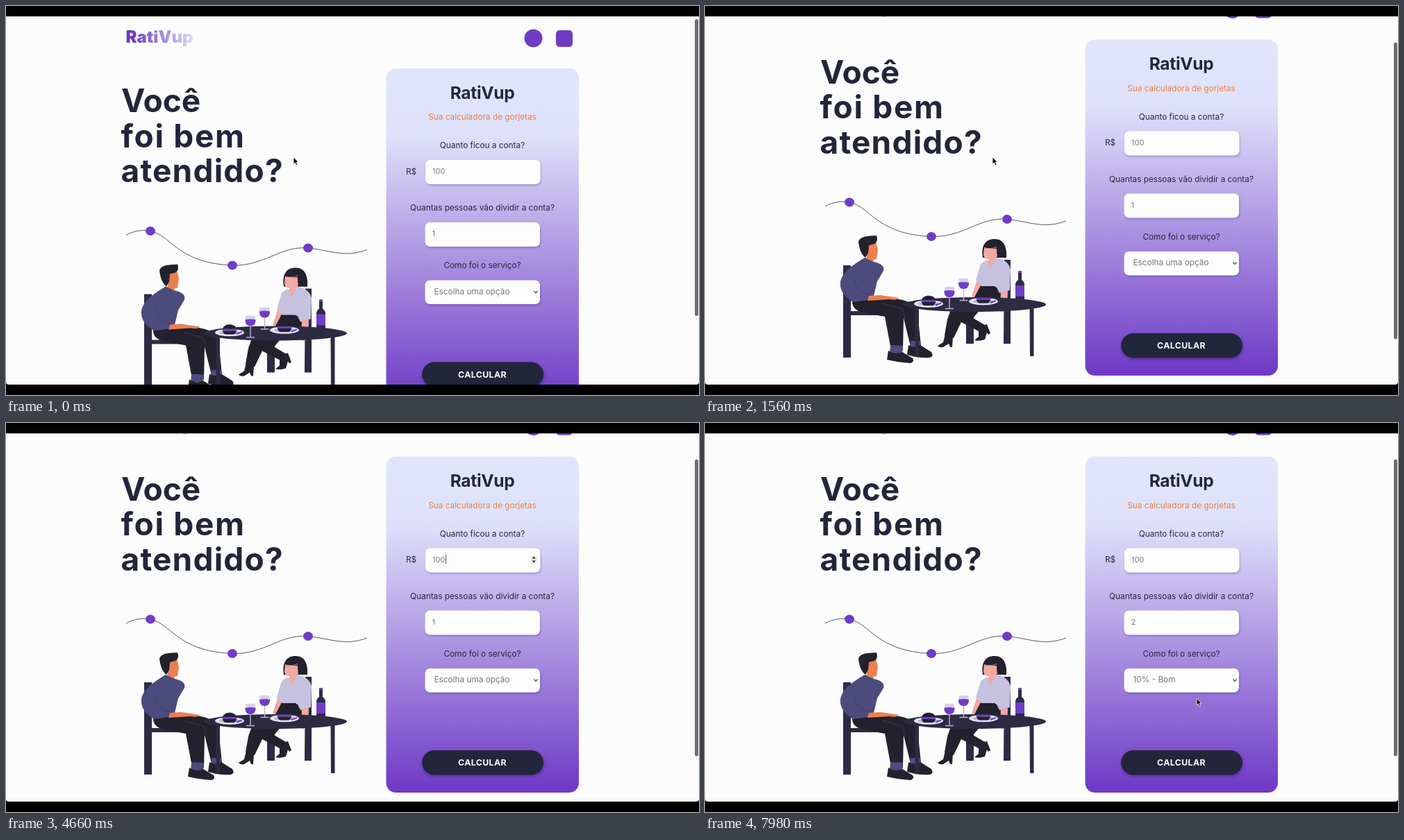
These frames come from a looping animation (998x561 px, 8 s). An HTML page:

```html
<!DOCTYPE html>
<html lang="pt-BR">
<head>
<meta charset="utf-8">
<title>Calculadora de gorjetas</title>
<style>
html, body { margin: 0; width: 100%; height: 100%; overflow: hidden; background: #000; }
svg { display: block; width: 100vw; height: 100vh; }
text { font-family: Inter, "Open Sans", sans-serif; font-size: 11.8px; fill: #25273a; }
.mid text { text-anchor: middle; }
.head text { font-size: 46px; font-weight: 700; fill: #23263a; }
.value text { fill: #777; }
.box { fill: #fdfdfd; filter: drop-shadow(1px 2px 1.5px rgba(50, 25, 110, .28)); }
.dark { fill: #22212d; }
.wood { fill: #2d2b42; }
.blue { fill: #4c4b7d; }
.skin { fill: #ec7f50; }
.pink { fill: #f2a8a4; }
.lilac { fill: #c6c1df; }
.violet { fill: #6f3cc6; }
</style>
</head>
<body>
<svg viewBox="0 0 998 561" preserveAspectRatio="none">
  <defs>
    <linearGradient id="cardFill" x1="0" y1="0" x2="0" y2="1">
      <stop offset="0" stop-color="#e0e5fc"/>
      <stop offset=".2" stop-color="#dfe1fa"/>
      <stop offset=".5" stop-color="#b5a1e6"/>
      <stop offset="1" stop-color="#6e38c5"/>
    </linearGradient>
    <linearGradient id="logoFill">
      <stop offset=".1" stop-color="#6d38c4"/>
      <stop offset="1" stop-color="#dcdcf8"/>
    </linearGradient>
    <clipPath id="view"><path d="M0 15 H998 V542 Q998 546 994 546 H4 Q0 546 0 542Z"/></clipPath>
    <g id="spinner">
      <rect x="755.5" y="232" width="9.5" height="13" rx="1.5" fill="#ececec"/>
      <path d="M757.6 237.2 L760.2 233.6 L762.8 237.2Z M757.6 239.8 L760.2 243.4 L762.8 239.8Z" fill="#444"/>
    </g>
    <g id="glass">
      <path d="M0 13 V31 M-6 31.5 H6" stroke="#b9b4d6" stroke-width="1.4" fill="none"/>
      <path d="M-6.5 0 H6.5 C9 9 6 15 0 15 S-9 9 -6.5 0Z" fill="#d4d0ea"/>
      <path d="M-7.6 6 Q0 4 7.6 6 C7.4 12 5 15 0 15 S-7.4 12 -7.6 6Z" class="violet"/>
    </g>
    <g id="meal">
      <ellipse rx="21" ry="5.2" fill="#e6e4f3"/>
      <ellipse rx="15" ry="3.2" fill="#b9b4d6"/>
      <path d="M-10 -5 C-9 -14 9 -14 10 -5Z" class="dark"/>
      <rect x="-10.5" y="-5.5" width="21" height="3" rx="1.5" class="violet"/>
      <path d="M-10 -2.5 H10 Q9 2.5 5 2.5 H-5 Q-9 2.5 -10 -2.5Z" class="dark"/>
      <path d="M10 2 L18 -1" stroke="#6f3cc6" stroke-width="2"/>
    </g>
  </defs>

  <rect width="998" height="561"/>
  <g clip-path="url(#view)">
    <rect y="15" width="998" height="531" fill="#fcfcfc"/>
    <g id="page">
      <text x="172.5" y="53" style="font-size:24px;font-weight:900;fill:url(#logoFill)">RatiVup</text>
      <circle cx="759.5" cy="46.5" r="13" class="violet"/>
      <rect x="792" y="35" width="24" height="24" rx="5" class="violet"/>

      <g class="head">
        <text x="166" y="153" letter-spacing="0">Você</text>
        <text x="165.5" y="203.5" letter-spacing="1.7">foi bem</text>
        <text x="165.5" y="254" letter-spacing="1.2">atendido?</text>
      </g>

      <g transform="translate(0 41.5)">
        <path d="M173 289 C185 282 198 281 208 283 C238 289 246 329 326 332.5 C372 334 395 304 435 307.5 C468 311 488 322 520 310" fill="none" stroke="#45445a" stroke-width=".9"/>
        <g class="violet">
          <ellipse cx="208" cy="283" rx="7" ry="6.4"/>
          <ellipse cx="326" cy="332.5" rx="7" ry="6.4"/>
          <ellipse cx="435" cy="307.5" rx="7" ry="6.4"/>
        </g>

        <!-- chairs -->
        <path class="wood" d="M199 374 H210 V440 H270 V446 H210 V507 H199Z M431 366 H440 V487 H430Z M376 436 H387 V487 H376Z"/>

        <!-- woman -->
        <path class="dark" d="M354 438 L398 436 L386 450 L403 460 L394 469 L369 456 L358 479 L345 475 L349 452Z"/>
        <path class="dark" d="M346 473 L357 477 L356 492 H353 L351 487 L343 492 Q337 493 335 490 L343 485Z"/>
        <path class="dark" d="M394 462 L406 459 L411 472 L408 474 L406 471 L403 481 Q395 484 388 482 L394 477Z"/>
        <path class="dark" d="M400 363 C397 344 405 336 417 336 C430 336 435 347 434 363 L422 363Z"/>
        <path class="pink" d="M402 348 Q411 351 420 347 L421 361 L417 366 L419 371 L411 381 L405 371 L409 365 Q402 366 401 358Z"/>
        <path class="pink" d="M391 397 L401 402 L391 421 L384 419Z"/>
        <path class="dark" d="M397 403 Q416 399 425 410 L430 433 L386 424Z"/>
        <path class="lilac" d="M406 366 L411 378 L419 363 Q437 366 440 380 L439 410 L424 414 L419 404 L398 404 L390 396 L397 372Z"/>
        <path class="pink" d="M426 412 L436 411 L435 435 Q431 444 425 440Z"/>
        <path class="dark" d="M400 349 Q418 351 425 345 L434 363 L421 363 L420 350Z"/>

        <!-- man -->
        <path class="dark" d="M212 424 L262 421 C286 422 303 428 306 441 L311 490 L296 491 L286 450 L285 497 L268 496 L259 448 L224 441 Q211 437 212 424Z"/>
        <path d="M288 449 L284 437 L255 429" stroke="#3a394b" stroke-width="1" fill="none"/>
        <path class="blue" d="M267 489 L285 490 L284 501 H266Z M296 483 L310 483 L311 493 H295Z"/>
        <path class="dark" d="M264 497 Q274 504 284 499 L299 508 Q302 513 296 515 Q278 514 262 510Z"/>
        <path class="dark" d="M293 489 Q302 494 310 489 L326 499 Q330 505 324 507 Q306 508 291 503Z"/>
        <path class="skin" d="M229 343 L246 339 L249 352 L247 365 L242 366 L244 374 L229 373 L233 361Z"/>
        <path class="dark" d="M221 340 C224 331 235 332 247 331 Q250 339 244 343 L236 345 L235 356 L231 363 C225 358 222 350 221 340Z"/>
        <path class="blue" d="M230 363 L243 369 C253 371 259 375 257 382 L248 397 L243 418 L236 424 L213 427 C199 418 194 409 195 398 C198 383 212 374 230 363Z"/>
        <path d="M216 393 Q214 410 237 417" stroke="#3f3e6b" stroke-width="1" fill="none"/>
        <path class="skin" d="M236 418 L253 417 L266 419 L279 421 Q277 425 266 423 L234 425Z"/>

        <!-- table -->
        <path class="wood" d="M302 434 H308 V505 H303Z M467.5 434 H473.5 V505 H468Z"/>
        <ellipse cx="388" cy="430.5" rx="103" ry="10.5" class="wood"/>
        <use href="#meal" x="322" y="429.5"/>
        <use href="#meal" x="401" y="426"/>
        <use href="#glass" x="352" y="405"/>
        <use href="#glass" x="372.5" y="393"/>
        <path class="wood" d="M451 382 H456 V395 Q460 398 460 402 V424 H447 V402 Q447 398 451 395Z"/>
        <path class="violet" d="M447 403 H460 V419 H447Z M451 382 H456 V385 H451Z"/>
      </g>

      <rect x="547.5" y="90" width="277.5" height="484.5" rx="14" fill="url(#cardFill)"/>
      <g class="mid">
        <text x="686" y="133.5" letter-spacing="-.3" style="font-size:24.5px;font-weight:700">RatiVup</text>
        <text x="686" y="164" style="fill:#ea803f">Sua calculadora de gorjetas</text>
        <text x="686" y="205">Quanto ficou a conta?</text>
        <text x="686" y="295">Quantas pessoas vão dividir a conta?</text>
        <text x="686" y="378">Como foi o serviço?</text>
      </g>
      <text x="576" y="242.5">R$</text>
      <rect class="box" x="604" y="222" width="165.5" height="35" rx="7"/>
      <rect class="box" x="603.5" y="312" width="165.5" height="35" rx="7"/>
      <rect class="box" x="603.5" y="395.5" width="165.5" height="34.5" rx="7"/>
      <g class="value">
        <text id="bill" x="614" y="242" style="font-size:11px"></text>
        <text id="people" x="613.5" y="332" style="font-size:11px"></text>
        <text id="service" x="616.5" y="415.5"></text>
      </g>
      <use id="spin1" href="#spinner"/>
      <use id="spin2" href="#spinner" y="90"/>
      <rect id="caret" width="1" height="13" fill="#555"/>
      <path d="M760.5 411 L763 414 L765.5 411" fill="none" stroke="#555" stroke-width="1.4"/>
      <rect x="599" y="513.5" width="175" height="35.5" rx="17.7" fill="#22263a" style="filter:drop-shadow(1px 2px 2px rgba(30,15,80,.4))"/>
      <text x="686" y="535.5" text-anchor="middle" letter-spacing=".4" style="font-size:12.3px;font-weight:700;fill:#fff">CALCULAR</text>
    </g>
    <rect id="thumb" x="992" width="5" height="428" rx="2.5" fill="#6d6d6d"/>
    <path id="arrow" d="M0 0 V10 L2.3 8 L4 12 L5.9 11.2 L4.2 7.3 H7.3Z" fill="#111" stroke="#fff" stroke-width=".8"/>
    <path id="beam" d="M-2.5 -5.5 Q0 -5.5 0 -4 Q0 -5.5 2.5 -5.5 M0 -4 V4 M-2.5 5.5 Q0 5.5 0 4 Q0 5.5 2.5 5.5" fill="none" stroke="#222" stroke-width="1.1"/>
  </g>
</svg>
<script>
const LOOP = 8000, MAX_SCROLL = 41.5;
const $ = id => document.getElementById(id);
const clamp = u => Math.min(1, Math.max(0, u));
const ease = (t, a, b) => { const u = clamp((t - a) / (b - a)); return u * u * (3 - 2 * u); };
const show = (id, on) => $(id).setAttribute('visibility', on ? 'visible' : 'hidden');
const move = (id, x, y) => $(id).setAttribute('transform', `translate(${x} ${y})`);
const write = (id, s) => { if ($(id).textContent !== s) $(id).textContent = s; };

// Pointer legs: start, end, target x, target y
const legs = [
  [1580, 2300, 634, 210],
  [4780, 5200, 650, 291],
  [5960, 6300, 735, 371],
  [6950, 7400, 708, 397]
];
const FOCUS1 = 2700, FOCUS2 = 5300, BLUR = 6700, CHOICE = 7450;
const keys = [3800, 4050, 4300], KEY2 = 5900;

function pointer(t) {
  let x = 414, y = 218;
  for (const [a, b, tx, ty] of legs) {
    const u = ease(t, a, b);
    x += (tx - x) * u;
    y += (ty - y) * u;
  }
  return [x, y];
}

function draw(t) {
  const scroll = MAX_SCROLL * ease(t, 1100, 1565);
  move('page', 0, -scroll);
  $('thumb').setAttribute('y', 19 + scroll * .81);

  const [x, y] = pointer(t);
  const over = top => x > 604 && x < 769 && y + scroll > top && y + scroll < top + 35;
  const hover1 = over(222), hover2 = over(312);
  const focus1 = t >= FOCUS1 && t < FOCUS2, focus2 = t >= FOCUS2 && t < BLUR;
  const typing = (t >= keys[0] && t < legs[1][0]) || (t >= KEY2 && t < legs[2][0]);

  const typed = keys.filter(k => t >= k).length;
  write('bill', '100'.slice(0, typed || 3));
  write('people', t < KEY2 ? '1' : '2');
  write('service', t < CHOICE ? 'Escolha uma opção' : '10% - Bom');

  show('spin1', hover1 || focus1);
  show('spin2', hover2 || focus2);

  const marks = [FOCUS1, ...keys, FOCUS2, KEY2].filter(k => t >= k);
  const blink = (t - marks[marks.length - 1]) % 1000 < 500;
  const count = focus1 ? typed : +(t >= KEY2);
  show('caret', (focus1 || focus2) && blink);
  $('caret').setAttribute('x', 613 + count * 6.7);
  $('caret').setAttribute('y', focus1 ? 231.5 : 321.5);

  const text = hover1 || hover2;
  show('arrow', !text && !typing);
  show('beam', text && !typing);
  move('arrow', x, y);
  move('beam', x, y);
}

function tick() {
  draw(performance.now() % LOOP);
  requestAnimationFrame(tick);
}
tick();
</script>
</body>
</html>
```
